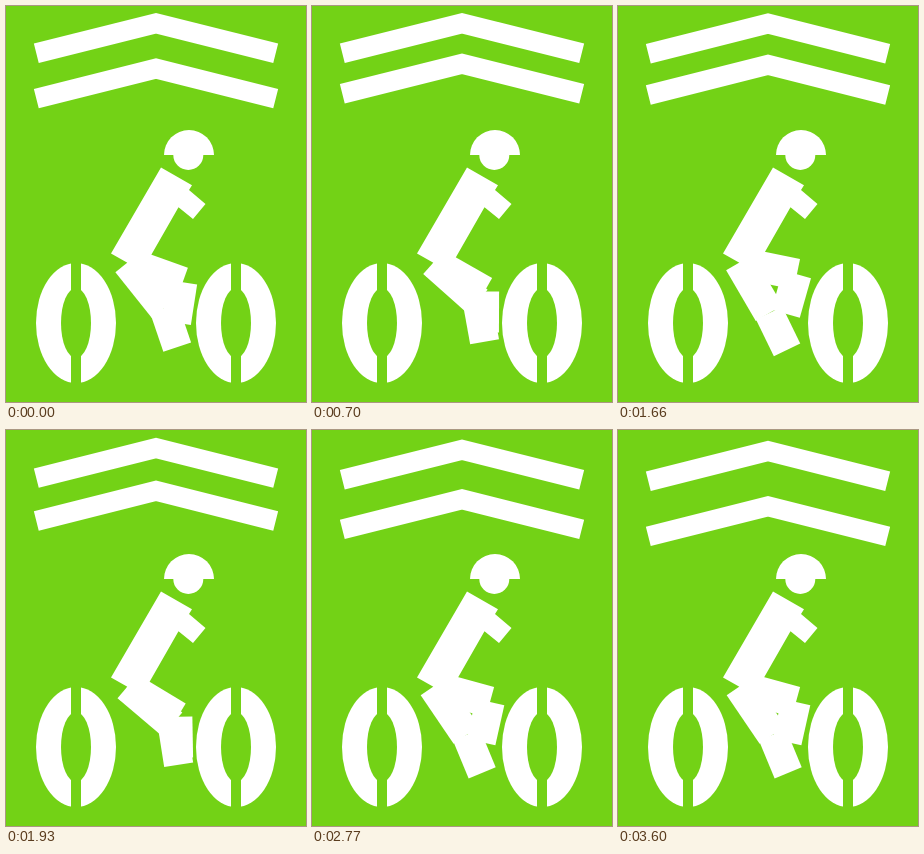
Recreate the animation shown at these times as an HTML page. Size 300 by 396 pixels, loop 3.7 s.

```html
<!DOCTYPE html>
<html lang="en">
<head>
<meta charset="utf-8">
<title>Cyclist lane marking</title>
<style>
  html, body { margin: 0; width: 100%; height: 100%; overflow: hidden; background: #73d216; }
  svg { display: block; width: 100%; height: 100%; fill: #fff; }
  .chevron { fill: none; stroke: #fff; stroke-width: 20; }
  .hole { fill: #73d216; }
</style>
</head>
<body>
<svg viewBox="0 0 300 396">
  <defs>
    <g id="wheel">
      <ellipse rx="40" ry="60"/>
      <ellipse class="hole" rx="15" ry="35"/>
      <rect class="hole" x="-5" y="-61" width="10" height="122"/>
    </g>
    <!-- Apex of the outer edge sits at the origin -->
    <path id="chevron" class="chevron" d="M-119.7 40.4 L0 10.3 L119.7 40.4"/>
  </defs>

  <use id="upper" href="#chevron"/>
  <use id="lower" href="#chevron"/>

  <use href="#wheel" x="70" y="317"/>
  <use href="#wheel" x="230" y="317"/>

  <path d="M158 149 A25 25 0 0 1 208 149 Z"/>
  <circle cx="182.3" cy="149" r="15"/>
  <path d="M155 161.5 L186 179.3 L183 184 L199.5 198 L187 213 L172.5 201.3 L136 265 L105 247.5 Z"/>

  <g class="leg"><rect class="thigh"/><rect class="shin"/></g>
  <g class="leg"><rect class="thigh"/><rect class="shin"/></g>
</svg>
<script>
  const LOOP = 3700;
  const HOLDS = [150, 130, 120, 150, 150, 130, 150, 150, 140, 120, 120, 150, 150, 120,
                 150, 130, 140, 150, 130, 140, 130, 150, 150, 130, 150, 120, 100];
  const HIP = { x: 121.5, y: 256.5 };
  const THIGH = { length: 58.6, width: 31 };
  const SHIN = { length: 41, width: 29.3 };
  const SWING = 609;          // ms from one leg crossing to the next
  const DRIFT = 6090;         // ms for one full chevron wave
  const DRIFT_LOW = 1060;     // moment the chevrons are highest on the stage

  const upper = document.getElementById('upper');
  const lower = document.getElementById('lower');
  const legs = document.querySelectorAll('.leg');

  function sizeLimb(limb, { length, width }) {
    limb.setAttribute('width', length);
    limb.setAttribute('height', width);
    limb.setAttribute('y', -width / 2);
  }

  function place(el, x, y, angle = 0) {
    el.setAttribute('transform', `translate(${x} ${y}) rotate(${angle})`);
  }

  function poseLeg(leg, swing) {
    const thighAngle = 35.6 + swing;
    const rad = thighAngle * Math.PI / 180;
    const [thigh, shin] = leg.children;
    place(thigh, HIP.x, HIP.y, thighAngle);
    place(shin, HIP.x + THIGH.length * Math.cos(rad), HIP.y + THIGH.length * Math.sin(rad),
          85 - 0.87 * swing);
  }

  const wave = t => 1 - Math.cos(2 * Math.PI * (t - DRIFT_LOW) / DRIFT);

  // The picture holds still between steps
  function stepStart(time) {
    let start = 0;
    for (const hold of HOLDS) {
      if (time < start + hold) break;
      start += hold;
    }
    return start;
  }

  function draw(now) {
    const t = stepStart(now % LOOP);
    place(upper, 150, 6.9 + 2.1 * wave(Math.max(t, DRIFT_LOW)));
    place(lower, 150, 46.7 + 10.3 * wave(t));
    const swing = 24 * Math.sin(Math.PI * (t - 140) / SWING);
    poseLeg(legs[0], swing);
    poseLeg(legs[1], -swing);
  }

  for (const leg of legs) {
    sizeLimb(leg.children[0], THIGH);
    sizeLimb(leg.children[1], SHIN);
  }

  let origin;
  function frame(now) {
    origin ??= now;
    draw(Math.max(0, now - origin));
    requestAnimationFrame(frame);
  }
  draw(0);
  requestAnimationFrame(frame);
</script>
</body>
</html>
```
